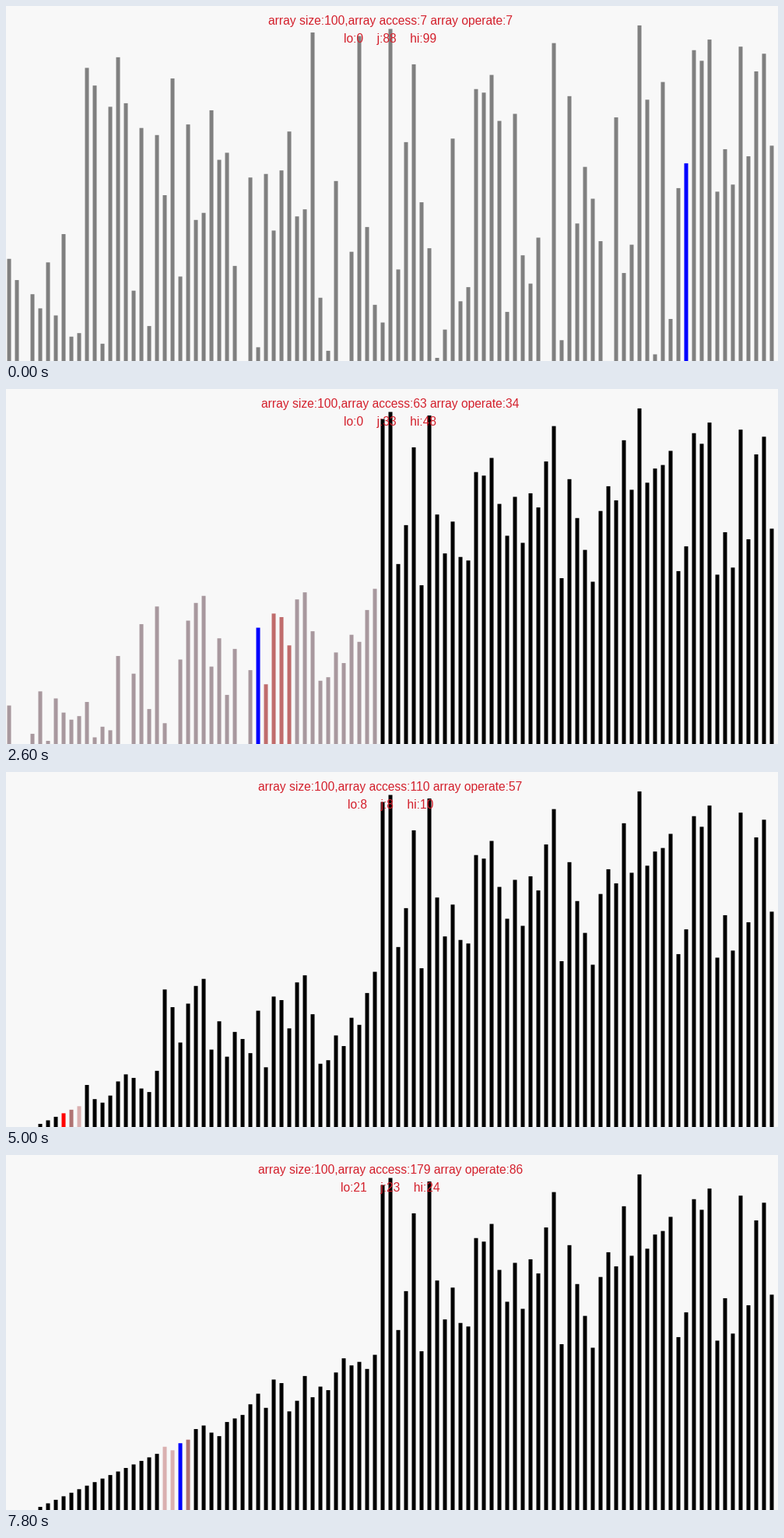
These frames come from a looping animation (992 px wide and 456 px high, 8 s). A matplotlib script:

```python
import numpy as np
import matplotlib.pyplot as plt
from matplotlib.animation import FuncAnimation

W, H, DPI = 992, 456, 64
FRAMES, INTERVAL = 40, 200
BLUE, RED, BLACK = "#0000ff", "#ff0000", "#000000"
# (bars in the active range, bars just scanned) for successive partitions
TONES = [("#808080", "#808080"), ("#a8989e", "#c06c6c"), ("#dab0b0", "#b07373")]

START = [
    48, 33, 27, 3, 23, 19, 32, 17, 40, 11, 12, 87, 82, 9, 76, 90, 77, 24, 70, 14,
    68, 51, 84, 28, 71, 44, 46, 75, 61, 63, 31, 0, 56, 8, 57, 41, 58, 69, 45, 47,
    97, 22, 7, 55, 2, 35, 96, 42, 20, 15, 98, 30, 66, 88, 49, 36, 5, 13, 67, 21,
    25, 81, 80, 85, 72, 18, 74, 34, 26, 39, 4, 94, 10, 79, 43, 59, 50, 38, 1, 73,
    29, 37, 99, 78, 6, 83, 16, 53, 60, 92, 89, 95, 52, 64, 54, 93, 62, 86, 91, 65,
]
FIRST_OP = 7


class QuickSort:
    """Quicksort that keeps a snapshot of every exchange."""

    def __init__(self, data):
        self.a = list(data)
        self.access = FIRST_OP
        self.calls = 0
        self.steps = []

    def record(self, lo, j, hi, mark):
        self.steps.append(dict(a=list(self.a), lo=lo, j=j, hi=hi, mark=mark,
                               access=self.access, call=self.calls))

    def swap(self, p, q):
        self.a[p], self.a[q] = self.a[q], self.a[p]

    def partition(self, lo, hi, i, j):
        a, pivot = self.a, self.a[lo]
        while True:
            i += 1
            while a[i] < pivot and i < hi:
                i += 1
                self.access += 1
            j -= 1
            while a[j] > pivot:
                j -= 1
                self.access += 1
            if i >= j:
                break
            self.swap(i, j)
            self.record(lo, j, hi, BLUE)
        self.swap(lo, j)
        self.record(lo, j, hi, RED)
        self.calls += 1
        return j

    def sort(self, lo, hi, i=None, j=None):
        if hi <= lo:
            return
        if i is None:
            i, j = lo, hi + 1
        mid = self.partition(lo, hi, i, j)
        self.sort(lo, mid)
        self.sort(mid + 1, hi)


# The loop opens in the middle of the first partition.
sorter = QuickSort(START)
sorter.record(0, 88, 99, BLUE)
sorter.sort(0, 99, 9, 88)
steps = sorter.steps

# Exchanges done at a few moments; the pace is even in between.
PACE = [(0, 7), (6, 21), (11, 32), (13, 34), (20, 47), (31, 69),
        (34, 77), (35, 78), (38, 84), (39, 86)]
ops = np.rint(np.interp(range(FRAMES), *zip(*PACE))).astype(int)


def bar_colors(n):
    s = steps[n]
    lo, j, hi = s["lo"], s["j"], s["hi"]
    base, scanned = TONES[min(s["call"], 2)]
    before = steps[max(n - 2, 0)]
    trail = before["j"] if before["call"] == s["call"] else j + 1
    colors = [BLACK] * len(START)
    colors[lo:hi + 1] = [base] * (hi + 1 - lo)
    for k in range(j + 1, min(trail, hi) + 1):
        colors[k] = scanned
    colors[j] = s["mark"]
    return colors


fig = plt.figure(figsize=(W / DPI, H / DPI), dpi=DPI, facecolor="#f8f8f8")
ax = fig.add_axes([0, 0, 1, 1])
ax.set_xlim(0, W)
ax.set_ylim(0, H)
ax.axis("off")

bars = ax.bar(10 * np.arange(len(START)) - 6, 0, width=5, linewidth=0, snap=False)
ax.set_xlim(0, W)
ax.set_ylim(0, H)


def label(y):
    return ax.text(494, H - y, "", color="#d4202c", family="Liberation Sans",
                   fontsize=15.65 * 72 / DPI, ha="center", va="baseline", zorder=5)


counts, bounds = label(24), label(47)


def draw(frame):
    op = ops[frame]
    n = op - FIRST_OP
    s = steps[n]
    for bar, value, color in zip(bars, s["a"], bar_colors(n)):
        bar.set_height(max(0, 4.543 * value - 18.7))
        bar.set_facecolor(color)
    counts.set_text(f"array size:100,array access:{s['access']} array operate:{op}")
    bounds.set_text(f"lo:{s['lo']}    j:{s['j']}    hi:{s['hi']}")
    return [*bars, counts, bounds]


anim = FuncAnimation(fig, draw, frames=FRAMES, interval=INTERVAL,
                     init_func=lambda: draw(0), repeat=True, repeat_delay=0)
plt.show()
```
